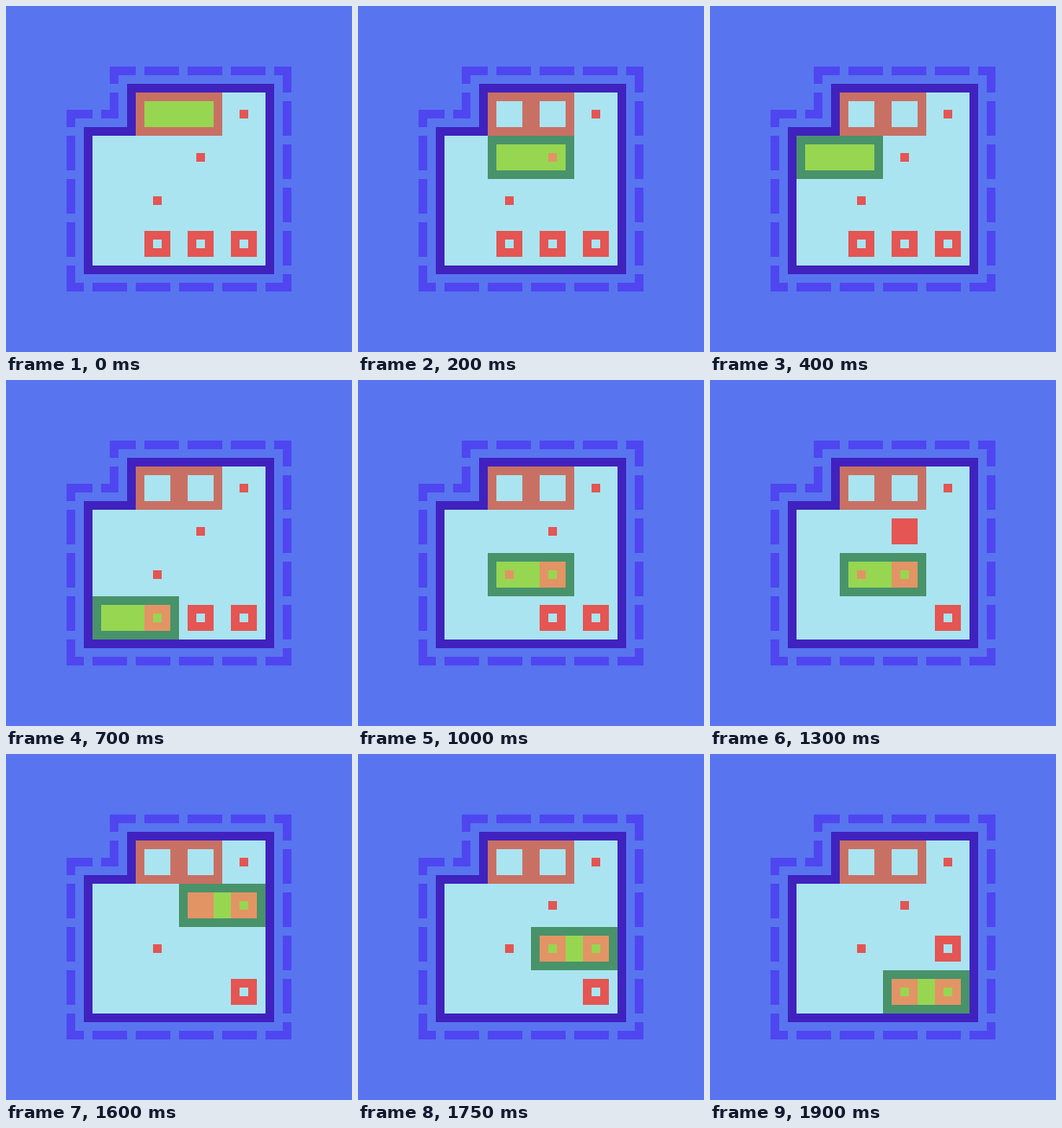
An HTML page with a canvas that plays this animation: 400x400 px, repeating every 2050 ms.

```html
<!DOCTYPE html>
<html lang="en">
<head>
<meta charset="utf-8">
<title>Block puzzle</title>
<style>
  html, body { margin: 0; width: 100%; height: 100%; overflow: hidden; background: #5874ef; }
  canvas { display: block; }
</style>
</head>
<body>
<canvas id="stage" width="400" height="400"></canvas>
<script>
const ctx = document.getElementById('stage').getContext('2d');
const CELL = 50, ORIGIN = 100, LOOP = 2050;
const COLOR = {
  back: '#5874ef', dash: '#4f46ef', wall: '#4022bf', floor: '#aae4f0', door: '#c97064',
  red: '#e45553', orange: '#e29465', green: '#97d651', frame: '#48936a'
};
const STEPS = { U: [0, -1], D: [0, 1], L: [-1, 0], R: [1, 0] };
const MOVES = 'DLDDURDURUDD';
const doors = [[1, 0], [2, 0]];
const dots = [[3, 0], [2, 1], [1, 2]];
const outline = new Path2D('M160 75H325V325H75V125H125V75H160');
const room = new Path2D('M145 95H305V305H95V145H145Z');

const isWall = (x, y) => x < 0 || y < 0 || x > 3 || y > 3 || (x === 0 && y === 0);
const inside = ([px, py], [x, y]) => y === py && (x === px || x === px + 1);

// Moves a ring one cell, pushing any ring ahead of it; a blocked ring stays.
function push(rings, ring, [dx, dy]) {
  const x = ring[0] + dx, y = ring[1] + dy;
  if (isWall(x, y)) return false;
  const ahead = rings.find(r => r[0] === x && r[1] === y);
  if (ahead && !push(rings, ahead, [dx, dy])) return false;
  ring[0] = x;
  ring[1] = y;
  return true;
}

function advance({ player, rings }, step) {
  const next = rings.map(r => [...r]);
  next.filter(r => inside(player, r)).forEach(r => push(next, r, step));
  return { player: [player[0] + step[0], player[1] + step[1]], rings: next };
}

const states = [{ player: [1, 0], rings: [[1, 3], [2, 3], [3, 3]] }];
for (const move of MOVES) states.push(advance(states.at(-1), STEPS[move]));

// Outlined box, inset from its cells, with a 10px line.
function box([x, y], inset, color, cells = 1) {
  ctx.strokeStyle = color;
  ctx.strokeRect(ORIGIN + x * CELL + inset, ORIGIN + y * CELL + inset,
    cells * CELL - 2 * inset, CELL - 2 * inset);
}

function draw({ player, rings }) {
  ctx.fillStyle = COLOR.back;
  ctx.fillRect(0, 0, 400, 400);
  ctx.lineWidth = 10;

  ctx.setLineDash([40, 10]);
  ctx.strokeStyle = COLOR.dash;
  ctx.stroke(outline);
  ctx.setLineDash([]);

  ctx.fillStyle = COLOR.floor;
  ctx.fill(room);
  ctx.strokeStyle = COLOR.wall;
  ctx.stroke(room);

  doors.forEach(d => box(d, 5, COLOR.door));

  const [px, py] = player;
  ctx.fillStyle = COLOR.green;
  ctx.fillRect(ORIGIN + px * CELL + 10, ORIGIN + py * CELL + 10, 80, 30);
  box(player, 5, py === 0 ? COLOR.door : COLOR.frame, 2);

  const tint = cell => inside(player, cell) ? COLOR.orange : COLOR.red;
  rings.forEach(r => box(r, 15, tint(r)));
  for (const dot of dots) {
    ctx.fillStyle = tint(dot);
    ctx.fillRect(ORIGIN + dot[0] * CELL + 20, ORIGIN + dot[1] * CELL + 20, 10, 10);
  }
}

// The first two poses last 200 ms, the others 150 ms.
function frame() {
  const t = performance.now() % LOOP;
  draw(states[Math.floor(t < 400 ? t / 200 : 2 + (t - 400) / 150)]);
  requestAnimationFrame(frame);
}
frame();
</script>
</body>
</html>
```
